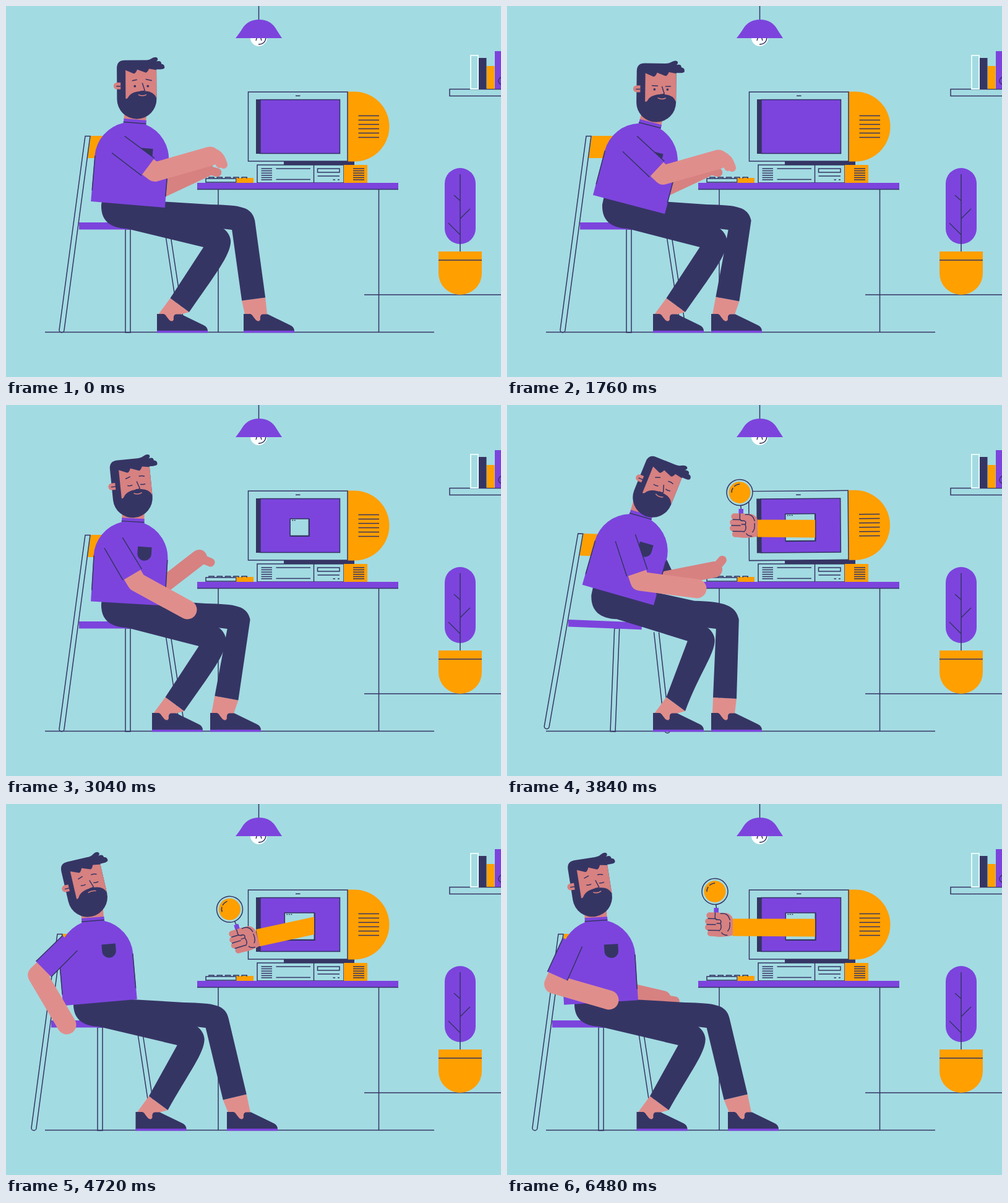
Write an HTML page that moves like this. It is 800x600 px and loops after 6560 ms.

```html
<!DOCTYPE html>
<html lang="en">
<head>
<meta charset="utf-8">
<title>Desk animation</title>
<style>
html, body { margin: 0; width: 100%; height: 100%; overflow: hidden; background: #a3dbe2; }
svg { display: block; width: 100vw; height: 100vh; }
.p { fill: #7c44dd; } .n { fill: #353564; } .o { fill: #ff9f00; }
.s { fill: #e08e8c; } .d { fill: #d78181; } .b { fill: #a3dbe2; }
.l { stroke: #353564; stroke-width: 1.5; }
.x { fill: none; }
.r { stroke-linecap: round; stroke-linejoin: round; fill: none; }
</style>
</head>
<body>
<svg viewBox="0 0 800 600">
  <defs>
    <clipPath id="out"><rect width="498" height="600"/></clipPath>
    <g id="shoe">
      <path class="n" d="M0 526V498H11Q14 499 16 503L20 508Q25 512 27 507Q26 499 31 498.5H39L75 516Q82 519 82 526Z"/>
      <path class="p" d="M0 525H82V528.5H0Z"/>
    </g>
  </defs>
  <rect class="b" width="800" height="600"/>

  <!-- room -->
  <path class="l x" d="M63 527.5H692M579 467H800M343 297V527M602.5 297V527M408.5 0V23"/>
  <circle cx="408.5" cy="51.5" r="13.5" fill="#fff"/>
  <path class="l x" d="M404 56L406 49M413 56L411 49M420 51Q419 62 408 62"/>
  <path class="p" d="M371 52Q378 43 381 38Q390 22 409 22Q428 22 437 38Q440 43 446 52Z"/>
  <rect class="l x" x="717" y="134.5" width="90" height="11"/>
  <rect class="x" x="751" y="80" width="12" height="54" stroke="#e6fbfb" stroke-width="2"/>
  <path class="n" d="M764 84H776.5V134H764Z"/>
  <path class="o" d="M777 97H789.5V134H777Z"/>
  <path class="p" d="M790 73H800V134H790Z"/>
  <circle class="l x" cx="802" cy="121" r="6"/>
  <rect class="p" x="709" y="262" width="50" height="123" rx="25"/>
  <path class="o" d="M699 397H769V432A35 35 0 0 1 699 432Z"/>
  <path class="l x" d="M734 272V397M724 306L734 315M750 328L734 344M715 351L734 370M699 411H769"/>

  <!-- computer and desk -->
  <path class="n" d="M449 250H563V257H449Z"/>
  <g id="monitor">
    <path class="o" d="M552 138.5H563A56.5 56.5 0 0 1 563 251.5H552Z"/>
    <path id="vents" class="l x"/>
    <rect class="b l" x="391.5" y="139" width="160.5" height="112"/>
    <path class="l x" d="M468 145.3H475.5"/>
    <path class="n" d="M404 151H412V239H404Z"/>
    <rect class="p l" x="411" y="151.5" width="128.5" height="87"/>
    <g id="win">
      <path id="shade" class="n"/>
      <path id="pane" class="b l"/>
      <path id="dots" class="l x" stroke-dasharray="2 1.5"/>
    </g>
  </g>
  <rect class="b l" x="406" y="257" width="140" height="29"/>
  <path class="o" d="M546 257H584V287H546Z"/>
  <path id="slots" class="l x"/>
  <path class="l x" d="M497.5 257V286M436.5 263H492M436.5 280.5H492M503.5 263H539V269H503.5ZM503.5 275H539M528.5 281H532M536 281H539"/>
  <path class="p" d="M309 286H634V297H309Z"/>
  <path class="l x" d="M309 296.5H634"/>
  <rect class="b l" x="323" y="279" width="49" height="6"/>
  <path class="o" d="M372.5 278H400V286H372.5Z"/>
  <path id="keys" class="l x"/>

  <!-- arm from the screen -->
  <g id="visitor" clip-path="url(#out)">
    <path id="sleeve2" class="o"/>
    <g id="fist">
      <circle class="b l" cx="-30" cy="-57.5" r="21"/>
      <circle class="o" cx="-30" cy="-57.5" r="17.5"/>
      <path class="l x" d="M-43 -57A14 14 0 0 1 -41 -65M-39 -67A14 14 0 0 1 -30 -71M-28 -36.5L-27 -30"/>
      <path class="p" d="M-31 -31H-23.5V-22H-31Z"/>
      <g class="d">
        <path d="M-30 -23H-10Q0 -20 0 -10V13Q-14 17 -30 15Z"/>
        <rect x="-43" y="-23.5" width="26" height="10" rx="5"/>
        <rect x="-45" y="-14" width="26" height="10" rx="5"/>
        <rect x="-45" y="-4.5" width="26" height="10" rx="5"/>
        <rect x="-41" y="5" width="26" height="10" rx="5"/>
      </g>
      <path class="l r" d="M-40 -13.5H-28M-42 -4H-28M-40 5.5H-23M-29 -23V-15Q-28 -11 -22 -12Q-18 -11 -20 -6H-26M-20 -22Q-8 -24 -5 -12M-20 -6Q-17 2 -22 6M-18 9Q-15 13 -9 13M-5 -8Q-4 2 -8 6"/>
    </g>
  </g>

  <!-- man -->
  <g id="chair">
    <path class="o" d="M-60 -318H-22V-282H-65Z"/>
    <path class="l x" d="M-69 -317.5H-61L-103 -4A4 4 0 0 1 -111 -4ZM-4 -167H4V0H-4ZM60 -163L84 -5A4 4 0 0 0 92 -5L68 -163"/>
    <path class="p" d="M-79 -178H40V-166.5H-79Z"/>
  </g>
  <path id="farSleeve" class="n"/>
  <path id="farArm" class="r" stroke="#d78181" stroke-width="26"/>
  <path id="farHand" class="r" stroke="#d78181" stroke-width="14"/>
  <path id="ankles" class="s"/>
  <path id="farLeg" class="n"/>
  <path id="nearLeg" class="n"/>
  <use id="farShoe" href="#shoe"/>
  <use id="nearShoe" href="#shoe"/>
  <g id="torso">
    <path class="d" d="M-18 -155H18V-130H-18Z"/>
    <path class="p" d="M-60 0V-74A60 60 0 0 1 -18 -131V-138H18.5V-131A60 60 0 0 1 60 -74V0Z"/>
    <path class="l x" d="M-18.5 -132.5H18.5M-59.5 -74V-18M59.5 -74V-18"/>
    <path class="n" d="M10.5 -93H33V-82A11.2 11.2 0 0 1 10.5 -82Z"/>
  </g>
  <g id="head">
    <path class="n" d="M-32 0V-50Q-32 -63 -19 -63H14Q20 -63 23 -65Q29 -69 33 -67Q36 -64 32 -61Q40 -63 40 -57Q46 -56 45 -50Q43 -48 38 -48H32V0A32 32 0 0 1 -32 0Z"/>
    <path class="d" d="M-18 -1V-47L-5 -41.5Q-2 -41 1 -48L14 -43Q17 -42 20 -49L32 -47V-1Q28 -12 14 -13Q-8 -14 -14 -3Q-16 0 -18 -1Z"/>
    <path class="d" d="M-26 -27H-32A5.500 5.500 0 0 0 -32 -16H-26Z"/>
    <path class="l x" d="M-33 -21H-26M9 -26L13 -14Q10 -12 6 -13"/>
    <path id="brows" class="l r"/>
    <path id="lids" class="l r" d="M-6 -20.5Q-3 -19.5 1 -20.5M15 -20.5Q18 -19.5 22 -20.5"/>
    <g id="eyes" class="n"><circle cx="-3" cy="-21" r="1.9"/><circle cx="18" cy="-21" r="1.9"/></g>
    <path id="mouth" class="r" stroke="#d78181" stroke-width="1.5"/>
  </g>
  <path id="arm" class="r" stroke="#e08e8c" stroke-width="31"/>
  <path id="fingers" class="r" stroke="#e08e8c" stroke-width="12"/>
  <path id="sleeve" class="p"/>
  <path id="seams" class="l x"/>
</svg>
<script>
const LOOP = 6560, STEP = 80, UPPER = 74, FORE = 93;
const $ = id => document.getElementById(id);
const path = (id, d) => $(id).setAttribute('d', d);
const place = (id, x, y, turn = 0, size = 1) =>
  $(id).setAttribute('transform', `translate(${x} ${y}) rotate(${turn}) scale(${size})`);
const show = (id, on) => $(id).setAttribute('visibility', on ? 'visible' : 'hidden');
const rows = (n, f) => Array.from({ length: n }, (_, i) => f(i)).join('');
const clamp = v => Math.min(1, Math.max(0, v));
const ease = (t, from, to) => (1 - Math.cos(Math.PI * clamp((t - from) / (to - from)))) / 2;
const wave = (t, period) => Math.sin(2 * Math.PI * t / period);
const rad = deg => deg * Math.PI / 180;
const within = (t, from, to) => t > from && t < to;

// point (x, y) turned by deg about the point o
function around(o, x, y, deg) {
  const c = Math.cos(rad(deg)), s = Math.sin(rad(deg));
  return [o[0] + x * c - y * s, o[1] + x * s + y * c];
}

path('vents', rows(6, i => `M569.5 ${177.5 + i * 7}H603`));
path('slots', rows(6, i => `M412.5 ${263 + i * 3.6}H430M561 ${263 + i * 3.6}H579`));
path('keys', rows(5, i => `M${328 + i * 13.3} 279V277h8V279`));

// each pose states only what differs from an earlier one
const type = { chair: 197, tilt: 0, turn: 5, nod: 0, shoulder: -24, handX: 330, handY: 243, grip: 1,
  farX: 322, farY: 264, wrist: 15, nearFoot: 244, farFoot: 384 };
const lean = { ...type, turn: 1, nod: -5, handY: 250, farX: 303, farY: 257, wrist: -40, nearFoot: 236 };
const hunch = { ...type, turn: 15, nod: 1, handX: 342, handY: 248, nearFoot: 236, farFoot: 330 };
const rest = { ...hunch, turn: 3.3, nod: -6, shoulder: -29, handX: 293, handY: 331, grip: 0, farX: 312, farY: 247, wrist: 22 };
const startle = { ...rest, chair: 171, tilt: 2.3, turn: 16, nod: 22, shoulder: -14, handX: 307, handY: 297,
  farX: 335, farY: 266, wrist: -50 };
const recoil = { ...rest, chair: 152, turn: -5, nod: -13, shoulder: -40, handX: 98, handY: 357,
  farX: 170, farY: 305, wrist: 180, nearFoot: 209.5, farFoot: 357 };
const relax = { ...recoil, turn: -3.5, nod: -9, handX: 165, handY: 317, farX: 252, farY: 315, wrist: 10 };

const moves = [[240, 700, lean], [1040, 1440, hunch], [2280, 2760, rest],
  [3520, 3840, startle], [3840, 4240, recoil], [4800, 5280, relax]];

function poseAt(t) {
  const pose = { ...type };
  for (const [from, to, next] of moves) {
    const u = ease(t, from, to);
    for (const k in pose) pose[k] += (next[k] - pose[k]) * u;
    if (t < to) break;
  }
  return pose;
}

// knees and hems follow from the hip and the feet
function drawLegs([hx, hy], { tilt, farFoot: fs, nearFoot: ns }) {
  const drop = hy - 321, kx = hx + 142 + 0.14 * (fs - hx) - 2 * tilt, nx = kx - 2;
  const d = kx - fs, ax = fs + 20.3 + 0.22 * d, skew = 0.13 * d;
  const farL = `${ax - 19} ${474 - skew}`, farR = `${ax + 19} ${474 + skew}`;
  const nearL = `${ns + 21.5} 472.5`, nearR = `${ns + 52} 495`;
  const ankle = (l, r, x) => `M${l}L${r}L${x + 38} 499L${x + 26} 512H${x + 16}L${x + 2} 499Z`;
  path('ankles', ankle(farL, farR, fs) + ankle(nearL, nearR, ns));
  path('farLeg', `M${hx + 30} ${hy - 4}L${hx + 60} ${hy - 4.5}L${kx - 35} ${321 + drop * 0.3}
    C${kx + 15} ${322 + drop * 0.3} ${kx + 32} 325 ${kx + 37} 347L${farR}L${farL}L${kx} 362L${kx - 25} 359L${hx} ${hy + 30}Z`);
  path('nearLeg', `M${hx - 40} ${hy - 14}L${hx - 43} ${hy}C${hx - 44} ${hy + 25} ${hx - 30} ${hy + 38} ${hx - 2} ${hy + 39}
    L${nx - 44} ${390 + drop * 0.6}L${nearL}L${nearR}C${nx - 25} 434 ${nx} 403 ${nx} 380
    C${nx - 1} 368 ${nx - 10} 358 ${nx - 22} 356L${hx + 60} ${hy - 4}Z`);
  place('farShoe', fs, 0);
  place('nearShoe', ns, 0);
}

// two-bone arm: the elbow follows from the shoulder and the hand
function drawArm(hip, { turn, shoulder, handX: x, handY, grip: g }, tap) {
  const y = handY + tap;
  const [px, py] = around(hip, shoulder, 0.3 * shoulder - 88, turn);
  const far = Math.min(UPPER + FORE - 1, Math.hypot(x - px, y - py));
  const ux = (x - px) / far, uy = (y - py) / far;
  const a = (far * far + UPPER * UPPER - FORE * FORE) / (2 * far);
  const h = Math.sqrt(Math.max(0, UPPER * UPPER - a * a));
  const ex = px + ux * a - uy * h, ey = py + uy * a + ux * h;
  const dx = (ex - px) / UPPER, dy = (ey - py) / UPPER;
  const cx = ex - dx * 14, cy = ey - dy * 14;
  const edge = (bx, by, w) => [bx + dy * w, by - dx * w];
  const upper = `${edge(px, py, 17)}L${edge(cx, cy, 17.5)}`;
  path('arm', `M${cx} ${cy}L${ex} ${ey}L${x} ${y}`);
  path('fingers', `M${x + 8 * g} ${y - 6 * g}q${10 * g} ${4 * g} ${14 * g} ${20 * g}M${x + 8 * g} ${y}l${7 * g} ${13 * g}`);
  path('sleeve', `M${upper}L${edge(cx, cy, -17.5)}L${edge(px, py, -17)}Z`);
  path('seams', `M${upper}M${edge(px, py, -17)}L${edge(cx, cy, -17.5)}`);
}

function drawFarArm([hx, hy], { tilt, farX: x, farY, wrist }, tap) {
  const y = farY - tap, tip = around([x, y], 20, 0, wrist), cuff = hx + 40 + 22 * tilt;
  path('farArm', `M${hx + 44} ${hy - 19}L${x} ${y}`);
  path('farHand', `M${x} ${y}L${tip}`);
  path('farSleeve', `M${cuff - 13} ${hy - 60}L${cuff} ${hy - 32}l-25 4Z`);
}

function drawFace(t) {
  const reading = within(t, 1240, 2400);
  const open = t < 360 || reading || within(t, 3160, 3720);
  show('eyes', open);
  show('lids', !open);
  path('brows', reading ? 'M-7 -27L2 -26.5M15 -26H23'
    : open ? 'M-7 -30L0 -31.5M15 -32L24 -30' : 'M-8 -32L-1 -34.5M14 -34Q18 -35 22 -33');
  path('mouth', `M3 -7q6 ${within(t, 4000, 5000) ? -2 : 3} 12 0`);
}

function drawScreen(t) {
  const size = 1 - (1 - clamp((t - 2860) / 460)) ** 2;
  const w = 48 * size, h = 43.6 * size, x = 474.3 - w / 2, y = 197.8 - h / 2;
  const box = (bw, bh) => `M${x} ${y}h${bw}v${bh}h${-bw}Z`;
  show('win', size > 0);
  path('pane', box(w, h));
  path('shade', box(w + 1.5, h + 1.5));
  path('dots', `M${x + 3} ${y + 2.5}h${9 * size}`);
  const shake = within(t, 3360, 4720) ? 0.7 * wave(t - 3360, 640) * (4720 - t) / 1360 : 0;
  $('monitor').setAttribute('transform', `rotate(${shake} 470 252)`);
}

function drawVisitor(t) {
  show('visitor', t > 3200);
  const out = ease(t, 3200, 3520), droop = ease(t, 4160, 4480) - ease(t, 4880, 5360);
  const sway = ease(t, 5280, 5600) * wave(t - 6480, 1120);
  const x = 560 - 155 * out + 2 * droop - 40 * ease(t, 4880, 5360);
  const y = 199.5 + 17 * droop - 3 * sway;
  const root = 200 - (y - 200) * 0.2, lean = Math.atan2(y - root, 498 - x);
  const nx = 14 * Math.sin(lean), ny = 14 * Math.cos(lean);
  path('sleeve2', `M498 ${root - 14.3}V${root + 14.3}L${x + nx} ${y + ny}L${x - nx} ${y - ny}Z`);
  place('fist', x, y, 1 - 18 * droop + 5 * sway, clamp((t - 3200) / 280));
}

function draw(t) {
  const pose = poseAt(t), breath = wave(t - 4720, 880);
  const tap = 3 * pose.grip * wave(t, 220);
  const hop = within(t, 3840, 4240) ? 11 * Math.sin(Math.PI * (t - 3840) / 400) : 0;
  const { chair, tilt, turn, nod } = pose, lift = 6 * tilt;
  const hip = [chair + 207 * Math.sin(rad(tilt)), 321 - lift];
  const [mx, my] = around(hip, 0, -171, turn);
  place('chair', chair, 528, tilt);
  place('torso', ...hip, turn + 0.3 * breath);
  place('head', mx + 0.4 * nod + 0.7 * breath, my + lift / 2 - hop, nod + 0.4 * breath);
  drawFarArm(hip, pose, tap);
  drawLegs(hip, pose);
  drawArm(hip, pose, tap);
  drawFace(t);
  drawScreen(t);
  drawVisitor(t);
}

const begin = performance.now();
function tick() {
  const t = (performance.now() - begin) % LOOP;
  draw(Math.floor(t / STEP) * STEP);
  requestAnimationFrame(tick);
}
tick();
</script>
</body>
</html>
```
